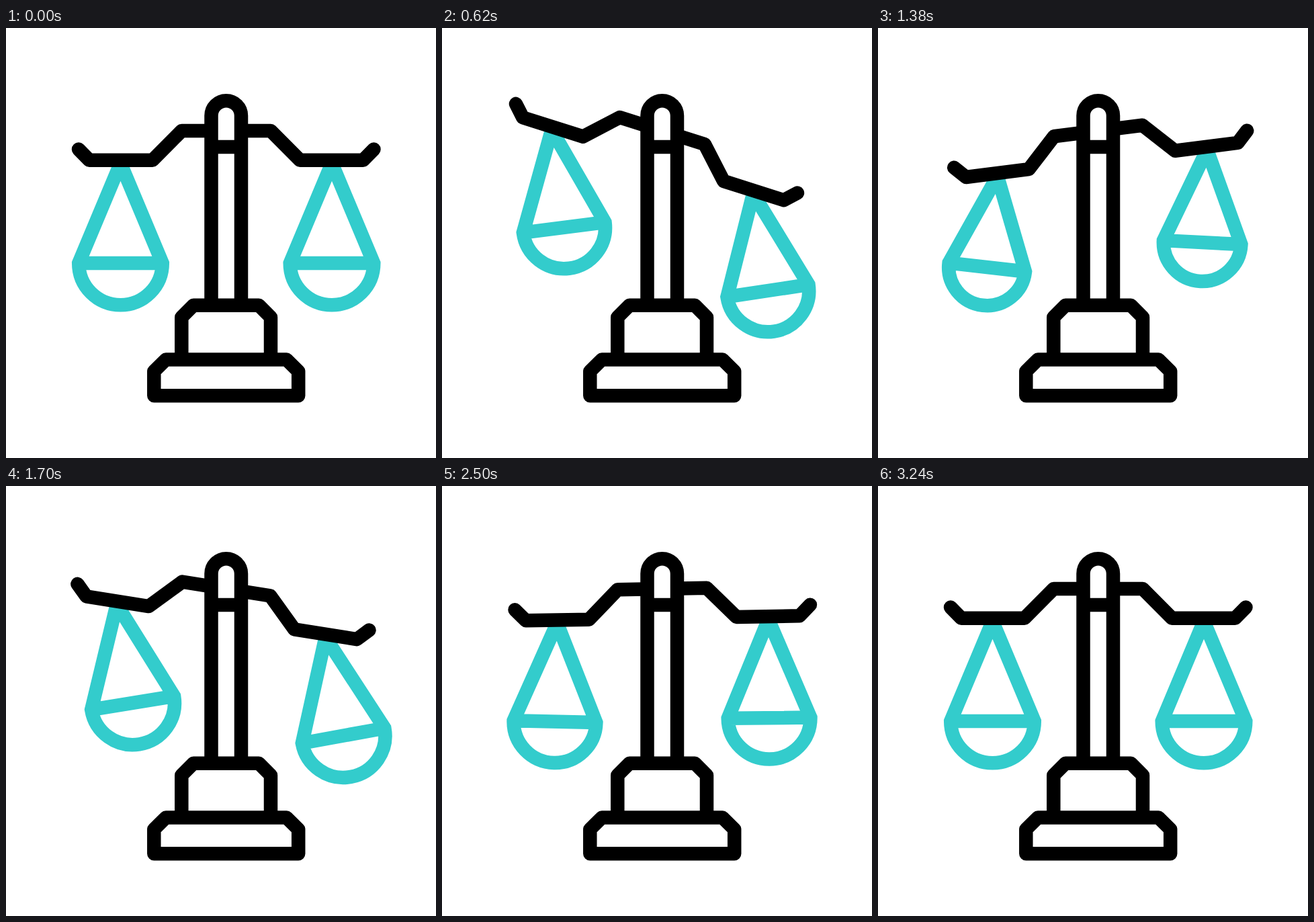
Recreate the animation shown at these times as an HTML page. Size 640 px wide and 640 px high, loop 3.6 s.

```html
<!DOCTYPE html>
<html lang="en">
<head>
<meta charset="utf-8">
<title>Scales</title>
<style>
  html, body { margin: 0; width: 100%; height: 100%; overflow: hidden; background: #fff; }
  svg { display: block; width: 100%; height: 100%; }
  path { fill: none; stroke: #000; stroke-width: 20.5; stroke-linejoin: round; stroke-linecap: round; }
  .pan { stroke: #3cc; stroke-linejoin: miter; stroke-miterlimit: 2; }
  .solid { fill: #fff; }
  .flat { stroke-linecap: butt; }
</style>
</head>
<body>
<svg viewBox="0 0 640 640">
  <g id="beam">
    <path class="pan" id="left"/>
    <path class="pan" id="right"/>
    <path d="M108 180.5 124 196.8H218L261.5 153H394L437.5 196.8H531.5L547.5 180.5"/>
  </g>
  <path class="solid flat" d="M305.5 412.5V130.5a22.25 22.25 0 0 1 44.5 0V412.5M305.5 177H350"/>
  <path class="solid" d="M261.3 493.5V430.5L279 412.8H376.3L394 430.5V493.5"/>
  <path class="solid" d="M220.3 547.2V511L238 493.5H417.5L435.2 511V547.2Z"/>
</svg>
<script>
const LOOP = 3600, STEP = 20;
const PIVOT = { x: 327.75, y: 153 };
const HANG_Y = 201.3, DROP = 148.7, RADIUS = 62.3;

// Poses at the turning points; pan angles are relative to the beam.
const times = [200, 690, 1200, 1700, 2200, 2700, 3230];
const beamAngles = [0, 20.5, -16.3, 9, -4.7, 1.5, 0];
const pans = [
  { id: "left", x: 170.5, angles: [0, -28.8, 31, -18.2, 14, -5.5, 0] },
  { id: "right", x: 485, angles: [0, -30.4, 26.2, -19.3, 12.5, -7.5, 0] }
];

const byId = id => document.getElementById(id);
const mix = (a, b, f) => a + (b - a) * f;
const rad = deg => deg * Math.PI / 180;

function locate(t) {
  if (t <= times[0]) return [0, 0];
  const last = times.length - 1;
  if (t >= times[last]) return [last - 1, 1];
  const i = times.findIndex(k => k > t) - 1;
  return [i, (t - times[i]) / (times[i + 1] - times[i])];
}

// Points travel in straight lines between poses, so a pan shrinks in mid-swing.
function panPath(x, from, to, f) {
  const c = mix(Math.cos(from), Math.cos(to), f);
  const s = mix(Math.sin(from), Math.sin(to), f);
  const point = (dx, dy) =>
    `${(x + dx * c - dy * s).toFixed(2)} ${(HANG_Y + dx * s + dy * c).toFixed(2)}`;
  const r = (RADIUS * Math.hypot(c, s)).toFixed(2);
  const l = point(-RADIUS, DROP), m = point(RADIUS, DROP);
  return `M${l}L${point(0, 0)}L${m}A${r} ${r} 0 0 1 ${point(0, DROP + RADIUS)}` +
    `A${r} ${r} 0 0 1 ${l}ZM${l}L${m}`;
}

function draw(t) {
  const [i, f] = locate(t);
  const tilt = mix(beamAngles[i], beamAngles[i + 1], f);
  byId("beam").setAttribute("transform", `rotate(${tilt.toFixed(3)} ${PIVOT.x} ${PIVOT.y})`);
  for (const { id, x, angles } of pans) {
    byId(id).setAttribute("d", panPath(x, rad(angles[i]), rad(angles[i + 1]), f));
  }
}

const start = performance.now();
function tick() {
  const t = (performance.now() - start) % LOOP;
  draw(Math.floor(t / STEP) * STEP);
  requestAnimationFrame(tick);
}
tick();
</script>
</body>
</html>
```
